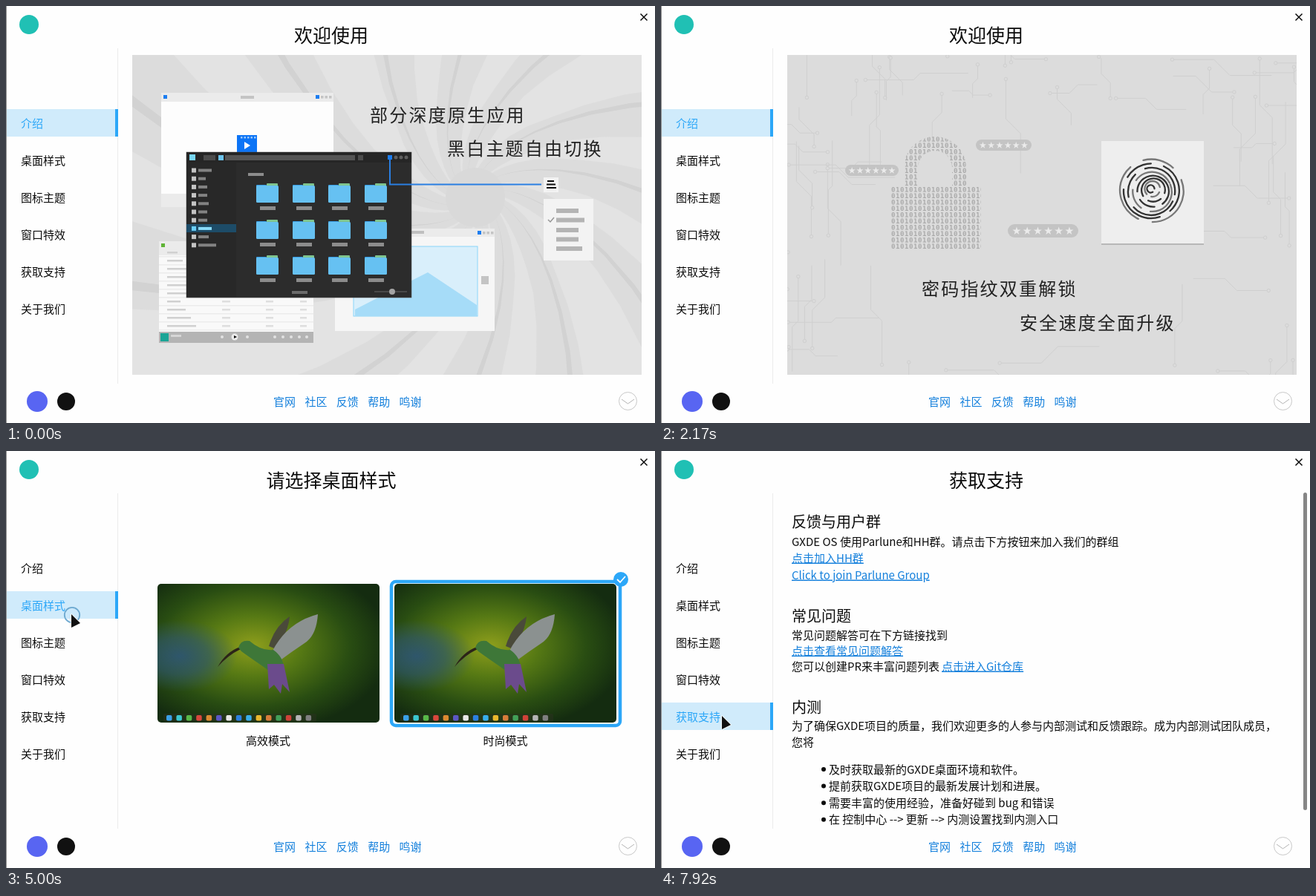
Write an HTML page that moves like this. It is 874x562 px and loops after 8 s.

```html
<!DOCTYPE html>
<html lang="zh-CN">
<head>
<meta charset="utf-8">
<title>欢迎使用</title>
<style>
html, body { margin: 0; width: 100%; height: 100%; overflow: hidden; background: #fefefe; }
svg { display: block; width: 874px; height: 562px; font-family: "Noto Sans CJK SC", "Noto Sans CJK", "Noto Sans", sans-serif; }
text { white-space: pre; }
</style>
</head>
<body>
<svg id="stage" viewBox="0 0 874 562" xmlns="http://www.w3.org/2000/svg"></svg>
<script>
const INK = '#0c0c0c', BLUE = '#1580dc', ACCENT = '#2ca7f8';

// Drawing helpers: each returns SVG markup
const rect = (x, y, w, h, fill, rx = 0, more = '') =>
  `<rect x="${x}" y="${y}" width="${w}" height="${h}" rx="${rx}" fill="${fill}" ${more}/>`;
const disc = (x, y, r, fill, more = '') => `<circle cx="${x}" cy="${y}" r="${r}" fill="${fill}" ${more}/>`;
const path = (d, fill, more = '') => `<path d="${d}" fill="${fill}" ${more}/>`;
const line = (d, stroke, w = 1, more = '') => path(d, 'none', `stroke="${stroke}" stroke-width="${w}" ${more}`);
const text = (x, y, s, size = 15, fill = INK, more = '') =>
  `<text x="${x}" y="${y + size * .37}" font-size="${size}" fill="${fill}" ${more}>${s}</text>`;
const mid = (x, y, s, size, fill) => text(x, y, s, size, fill, 'text-anchor="middle"');
const group = (s, more = '') => `<g ${more}>${s}</g>`;
const at = (x, y, s) => group(s, `transform="translate(${x} ${y})"`);
const each = (list, fn) => list.map(fn).join('');
const times = (n, fn) => each([...Array(n).keys()], fn);

let seed = 7;
const rnd = () => (seed = (seed * 16807) % 2147483647) / 2147483647;

// ---------- carousel ----------
const slogan = (x, y, s) => text(x, y, s, 24, '#222', 'letter-spacing="2.2" font-weight="500"');
const backdrop = rect(170, 66, 686, 431, '#dcdcdc');

function swirl(cx, cy) {
  const arm = (a, half, fill) => {
    const edge = s => [...Array(14).keys()].map(i => {
      const r = 36 * 1.27 ** i, th = a + s * half * Math.min(1, r / 150) + .42 * Math.log(r / 36);
      return (cx + r * Math.cos(th)).toFixed(1) + ' ' + (cy + r * Math.sin(th)).toFixed(1);
    });
    return path('M' + [...edge(-1), ...edge(1).reverse()].join('L') + 'Z', fill);
  };
  return times(12, i => arm(i * .524, i % 3 ? .1 : .16, '#e3e3e3') + arm(i * .524 + .23, .014, '#d2d2d2'))
    + disc(cx, cy, 40, '#d9d9d9');
}

function folderGrid() {
  return each([239, 288, 336], y => each([337, 386, 434, 483], x =>
    rect(x + 14, y, 15, 6, '#7fc48e', 1) + rect(x, y + 2, 14, 5, '#3a9fe6', 1) + rect(x, y + 3, 30, 23, '#66c1f2', 1.5) +
    rect(x + 5, y + 31, 21, 5, '#8c8c8c')));
}

function appsSlide() {
  const dots = (x, y) => rect(x, y, 5, 5, '#1c7df0') + times(3, i => rect(x + 7 + i * 5.5, y + 1, 3.5, 3.5, '#c4c4c4'));
  const video = rect(209, 117, 232, 154, '#ebebeb') + rect(209, 129, 232, 124, '#fdfdfd') +
    rect(212, 120, 5, 5, '#1c7df0') + rect(316, 121, 18, 4, '#c4c4c4') + dots(417, 120) +
    rect(311, 174, 27, 23, '#0c74f6') + path('M321 183l8 5-8 5z', '#fff') +
    times(5, i => rect(316 + i * 4.5, 176, 2.5, 2.5, '#9cc8fa'));
  const music = rect(206, 317, 208, 136, '#f9f9f9') + rect(206, 317, 208, 19, '#ebebeb') + rect(209, 320, 5, 5, '#5fb336') +
    times(10, i => { const y = 331 + i * 11;
      return rect(206, y + 6, 208, 1.5, '#ececec') + rect(217, y, 14 + i * 7 % 38, 2.5, '#d0d0d0') +
        rect(291, y, 11, 2.5, '#dedede') + rect(350, y, 10, 2.5, '#dedede') + rect(396, y, 9, 2.5, '#dedede'); }) +
    rect(206, 439, 208, 15, '#b4b4b4') + rect(208, 441, 11, 11, '#1ba596') + rect(222, 443, 14, 3, '#d6d6d6') +
    disc(308, 446, 4.5, '#ececec') + path('M307 444l4 2-4 2z', INK) +
    each([291, 325, 362, 373, 384, 395, 405], x => disc(x, 446, 2, '#e2e2e2'));
  const photo = rect(443, 300, 215, 138, '#f6f6f6') + rect(443, 300, 215, 11, '#ebebeb') + rect(540, 303, 23, 4, '#bfbfbf') + dots(635, 303) +
    rect(468, 324, 167, 94, '#d9effb', 0, 'stroke="#8ad6fa"') + path('M470 418V409L568 359 634 403V418Z', '#a6dcf8') +
    rect(640, 364, 10, 11, '#c4c4c4');
  const widths = [18, 10, 12, 12, 14, 12, 12, 18, 14, 24];
  const files = rect(243, 197, 303, 196, '#2c2c2c', 0, 'stroke="#555" stroke-width=".6"') + rect(243, 197, 303, 14, '#262626') +
    rect(243, 211, 67, 181, '#282828') + rect(247, 200, 8, 8, '#78d6f2') + rect(266, 201, 16, 7, '#4c4c4c') +
    rect(286, 201, 7, 7, '#6cc4ee') + rect(295, 201, 175, 7, '#555') + rect(474, 201, 7, 7, '#4c4c4c') +
    rect(514, 201, 6, 6, '#1c7df0') + times(3, i => disc(525 + i * 7, 204, 2.5, '#606060')) +
    rect(243, 294, 67, 11, '#1d4c68') +
    each(widths, (w, i) => rect(250, 218.5 + i * 11.2, 6, 6, i == 7 ? '#6bd0fb' : '#c4c4c4') +
      rect(259, 219.5 + i * 11.2, w, 4, i == 7 ? '#8adcfb' : '#828282')) +
    rect(326, 225, 21, 4, '#8c8c8c') + folderGrid() + rect(385, 384, 21, 4, '#6c6c6c') +
    line('M496 385H540', '#666') + disc(520, 385, 4, '#a4a4a4');
  const menu = line('M517 207V240.5H721', '#2a7fe2', 2) + rect(724, 231, 20, 20, '#f3f3f3') +
    line('M729 236H738M728 240.5H740M728 245H741', INK, 2) + rect(724, 260, 67, 83, '#f3f3f3') +
    each([[273, 30], [285.5, 38], [299, 30], [311.5, 30], [324, 35]], ([y, w]) => rect(741, y, w, 6, '#b4b4b4')) +
    line('M730 288l3 3 5-6', '#969696', 1.5);
  return backdrop + swirl(632, 258) + video + music + photo + files + menu +
    slogan(490, 147, '部分深度原生应用') + slogan(594, 192, '黑白主题自由切换');
}

function circuits() {
  return times(170, () => {
    const x = 170 + rnd() * 686, y = 66 + rnd() * 431, l = 15 + rnd() * 50, d = 5 + rnd() * 18;
    const sx = rnd() < .5 ? -1 : 1, sy = rnd() < .5 ? -1 : 1;
    if (Math.abs(x - 513) < 285 && Math.abs(y - 300) < 175) return '';
    const run = rnd() < .5 ? `h${l * sx}l${d * sx} ${d * sy}h${l * sx}` : `v${l * sy}l${d * sx} ${d * sy}v${l * sy}`;
    return line(`M${x} ${y}${run}`, '#cfcfcf', 1) + disc(x, y, 2.2, '#dcdcdc', 'stroke="#cfcfcf"');
  });
}

function fingerprint(cx, cy) {
  return times(8, i => {
    const r = 5 + i * 5.3, gap = 5 + i * 2.1;
    return `<ellipse cx="${cx}" cy="${cy + 3 - i * .4}" rx="${r}" ry="${r * 1.02}" fill="none" stroke="${i % 3 == 1 ? '#777' : '#333'}"
      stroke-width="2.3" stroke-linecap="round" stroke-dasharray="${18 + i * 9} ${gap} ${8 + i * 5} ${gap}" transform="rotate(${150 + i * 47} ${cx} ${cy})"/>`;
  });
}

function lockSlide() {
  const pill = (x, y, w, h) => rect(x, y, w, h, '#c4c4c4', h / 2) +
    times(6, i => mid(x + w * (i + .85) / 6.7, y + h / 2, '★', h * .66, '#ebebeb'));
  return backdrop + circuits() +
    rect(310, 243, 121, 86, 'url(#digits)') + path('M327 243V218A42 42 0 0 1 411 218V243H392V218A23 23 0 0 0 346 218V243Z', 'url(#digits)') +
    pill(424, 180, 75, 15) + pill(248, 214, 72, 15) + pill(467, 294, 95, 18) +
    rect(593, 184, 138, 138, '#b8b8b8') + rect(593, 182, 138, 138, '#eee') + fingerprint(661, 249) +
    slogan(351, 381, '密码指纹双重解锁') + slogan(483, 427, '安全速度全面升级');
}

function panelSlide() {
  const LIGHT = '#f5f5f5', PALE = '#e6e6e6';
  const card = (y, h) => rect(687, y, 165, h, '#c2c2c2');
  const slider = (y, knob) => card(y, 34) + rect(694, y + 6, 27, 4, LIGHT) + rect(835, y + 6, 13, 4, LIGHT) +
    line(`M700 ${y + 17}H842`, PALE, 1.5) + times(7, i => rect(699 + i * 23.5, y + 23, 1.5, 4, PALE)) + disc(knob, y + 16, 2.5, LIGHT);
  const heading = (y, w) => rect(692, y - 5, 10, 10, LIGHT, 3) + rect(707, y - 3.5, w, 7, PALE);
  const cat = path('M750 338Q751 324 757 319l5 4q8-2 16 0l6-4q5 6 5 19Z', LIGHT) +
    line('M736 338H811', LIGHT) + rect(749, 334, 12, 8, LIGHT, 4) + rect(783, 334, 12, 8, LIGHT, 4) + line('M764 332h2M778 332h2', '#a0a0a0', 1.5);
  return backdrop + swirl(622, 268) + rect(656, 66, 200, 431, '#ababab') +
    rect(687, 73, 9, 9, PALE, 2) + rect(753, 74, 28, 8, LIGHT, 1) +
    slider(94, 769) + slider(132, 840) + card(172, 11) + card(184, 11) + rect(694, 175, 72, 5, LIGHT) + rect(694, 187, 72, 5, LIGHT) +
    disc(836, 178, 2.5, LIGHT) + rect(833, 186, 14, 6, '#888', 3) + disc(844, 189, 2.5, LIGHT) +
    heading(216, 54) + card(227, 10) + disc(836, 232, 2.5, LIGHT) + slider(241, 699) + slider(277, 793) + card(313, 36) + rect(694, 317, 27, 5, LIGHT) + cat +
    card(354, 12) + rect(694, 358, 15, 4, LIGHT) + slider(368, 769) + card(403, 11) + rect(694, 406, 27, 5, LIGHT) + disc(836, 408, 2.5, LIGHT) +
    heading(435, 36) + slider(446, 769) + card(484, 13) + rect(694, 487, 27, 4, LIGHT) +
    times(12, i => disc(671, 136.5 + i * 22.3, i == 8 ? 7 : 5, i == 8 ? '#e4e4e4' : '#c4c4c4')) +
    path('M672 315v11l5-3z', INK) +
    slogan(249, 264, '控制中心左侧导航') + slogan(357, 309, '一键直达设置选项');
}

// ---------- icon theme page (icons centred on 0,0) ----------
const gear = (n, r, fill) => times(n, i => rect(-5, -r, 10, 14, fill, 3, `transform="rotate(${i * 360 / n})"`)) + disc(0, 0, r * .78, fill);
const film = rect(-21, -21, 42, 42, '#0878e8', 2) + times(7, i => rect(-18 + i * 5.5, -18, 3, 4, '#043f88') + rect(-18 + i * 5.5, 14, 3, 4, '#043f88')) +
  rect(-20, -11, 40, 22, '#0f68d0') + path('M-5-7L8 0-5 7Z', '#fff');
const note = fill => line('M0 8V-10q2 5 7 7', fill, 2.5) + `<ellipse cx="-4" cy="8" rx="5" ry="4" fill="${fill}"/>`;

const light = [
  path('M-19-11L2-21 16-11Z', '#179be8') + rect(-19, -12, 37, 33, '#62d2fa', 2) + rect(-17, -10, 33, 5, '#c8f2ff') +
    rect(-6, -5, 12, 16, '#a8e8fd', 2) + disc(0, -1, 3, '#fff') + rect(-1, 2, 2, 6, '#fff'),
  disc(9, 0, 18, '#222b22') + disc(9, 0, 4, '#7db400') + rect(-22, -19, 30, 38, '#8fcb0f', 2) + at(-6, 1, note('#fff')),
  rect(-19, -16, 39, 37, '#f5f5f5', 1, 'stroke="#ddd"') + rect(-16, -12, 33, 26, '#f9b234') + path('M-16 14L-4-4 5 6 9 1 17 14Z', '#8b78c8') + path('M-16 14L-8 4 0 14Z', '#6d68bc'),
  rect(-21, -19, 10, 34, '#0b58c8', 1) + rect(-13, -16, 34, 37, '#188cfa', 2) + times(6, i => rect(-10, -13 + i * 5.5, 3, 3, '#b6e0ff')) + path('M-2-6L10 1-2 8Z', '#fff'),
  disc(0, 0, 21, '#e4493c'),
  gear(8, 21, '#dedee0') + disc(0, 0, 11, '#f5f5f5', 'stroke="#f07b78" stroke-width="4"')];
const flat = [
  rect(-15, -22, 30, 6, '#37a6e0') + rect(-18, -16, 36, 6, '#7cc34a') + rect(-20, -11, 40, 6, '#e59a37') + rect(-22, -6, 44, 27, '#8a7b5a', 2) + rect(-7, 4, 14, 4, '#f7f4ea', 1),
  disc(0, 0, 21, '#525252') + note('#46c838'),
  rect(-21, -19, 43, 38, '#209cf0', 2) + disc(-10, -8, 7, '#fdd638') + path('M-21 19V10L-8-1 9 19Z', '#247f4a') + disc(2, 1, 5, '#fff') + disc(9, -2, 7, '#fff') + rect(-2, 0, 20, 7, '#fff', 3.5),
  film, light[4],
  gear(6, 21, '#11805c') + disc(0, 0, 10, '#fefefe') + rect(-3.5, 0, 7, 20, '#e2e2e2', 3) + rect(-2.5, -10, 5, 9, '#11805c')];
const sea = [
  rect(-20, -19, 39, 38, '#71c7b8', 3) + path('M3 18Q6 0 20 8q5 8-1 10Z', '#6d5680') + line('M8 17l4-10M14 18l2-9', '#a990b8', 1.5),
  `<ellipse rx="15" ry="10" fill="#6b8b3c" transform="rotate(35)"/>` + disc(-12, -15, 6, '#9aaf65') + line('M-6-6l20-7M-8 2l-10 7M2 8l0 11M10 8l9 6', '#879c4a', 5, 'stroke-linecap="round"') + line('M-7-4l14 9M1-8l-4 13', '#435f28', 1.5),
  rect(-21, -5, 42, 13, '#b8721c', 4) + disc(0, -3, 18, '#d9932b') + rect(-17, 12, 34, 9, '#c47e22', 3) + disc(0, -3, 12, '#382e20') + line('M-9-9L9 5M9-9L-9 5M0-14V9M-11-3H11', '#d9932b', 2),
  times(7, i => disc(14 * Math.cos(i * .9), 14 * Math.sin(i * .9), 8, i % 2 ? '#5e8034' : '#486a2a')) + disc(0, 0, 14, '#55772e') + path('M-5-8L9 0-5 8Z', '#26370f'),
  disc(0, 0, 21, '#ef9a88'),
  times(8, i => rect(-1.5, -22, 3, 22, '#c58a2e', 1.5, `transform="rotate(${i * 45})"`)) + disc(0, 0, 14, 'none', 'stroke="#d99b36" stroke-width="5"') + disc(0, 0, 5, '#a66d20')];

const badge = (x, y) => disc(x, y, 10, ACCENT) + line(`M${x - 5} ${y}l4 4 7-8`, '#fff', 1.8);
const title = s => mid(438, 40, s, 25);

function iconPage() {
  const themes = [['deepin', light], ['ePapirus', flat], ['ePapirus-Dark', flat], ['gxde', light], ['gxde-dark', light], ['gxde-Sea', sea]];
  const cards = each(themes, ([name, icons], i) => {
    const x = 176 + i % 2 * 336.5, y = 92 + (i >> 1) * 149;
    const frame = i == 3 ? rect(509.5, 236.5, 332, 76, '#fefefe', 5, `stroke="${ACCENT}" stroke-width="4.5"`)
      : rect(x + .5, y + .5, 324, 69, '#fefefe', 5, 'stroke="#ececec"');
    return frame + each(icons, (icon, k) => at(x + 30 + k * 52.8, y + 34, icon)) + mid(x + 161.5, y + 93, name);
  });
  return title('请选择图标主题') + group(cards, 'clip-path="url(#list)"') + badge(843, 234);
}

// ---------- two-choice pages ----------
const dockColors = ['#3aa0e8', '#3bc7d0', '#58b848', '#d9473c', '#dc8a31', '#5b57c4', '#e8e8e8', '#2c80e0', '#38aeec', '#e9b82d', '#d77c3a', '#42a058', '#cf4238', '#b5b5b5', '#7f7f7f'];

function desktop(x, panel) {
  const bird = path('M81 112Q92 92 111 85L112 88Q95 96 81 112Z', '#2c2418') +
    path('M150 84Q158 57 178 44 176 66 160 88Z', '#4a4a3a') + path('M154 92Q174 52 216 41 214 70 198 80 180 92 164 104Z', '#8b9190') +
    path('M109 86Q112 75 124 77 140 91 156 89 170 99 170 114 156 123 143 112 124 99 113 91Z', '#3e7738') +
    path('M148 108L170 108 178 146 168 135 166 148 157 136 150 142Z', '#6b4b8c');
  const bars = [[22, 16], [56, 10], [91, 12], [126, 20], [152, 14]];
  const side = panel && rect(216, 0, 83, 187, panel) + rect(249, 4, 20, 3, '#c9c9c9') +
    each(bars, ([y, w]) => disc(222, y - 4, 2, '#eee') + rect(227, y - 5, w, 2.5, '#aaa')) +
    each([[24, 10], [35, 8], [61, 23], [88, 7], [97, 7], [108, 8], [133, 8], [160, 8], [170, 8], [179, 6]], ([y, h]) => rect(218, y, 79, h, '#aaa', 1, 'opacity=".28"')) +
    rect(226, 72, 64, 1, '#bbb') + path('M286 70h4v3l-2 2-2-2z', '#fff') + disc(290, 181, 2, '#fff');
  return at(x, 179, group(rect(0, 0, 299, 187, 'url(#leaf)') + rect(0, 0, 299, 187, 'url(#haze)') + bird + (side || '') +
    rect(8, 175, 206, 11, '#2a3020', 2, 'opacity=".5"') + each(dockColors, (c, i) => rect(12 + i * 13.4, 177, 7.5, 7.5, c, 2)), 'clip-path="url(#thumb)"'));
}

const choice = (heading, left, right, panels) => title(heading) + desktop(204, panels[0]) + desktop(523, panels[1]) +
  rect(519, 176, 308, 194, 'none', 6, `stroke="${ACCENT}" stroke-width="4.5"`) + badge(828, 173) +
  mid(353, 390, left) + mid(672.5, 390, right);

// ---------- support page ----------
function supportPage() {
  const link = (x, y, s) => text(x, y, s, 15, BLUE, 'text-decoration="underline"');
  const head = (y, s) => text(176, y, s, 20);
  const bullets = ['及时获取最新的GXDE桌面环境和软件。', '提前获取GXDE项目的最新发展计划和进展。', '需要丰富的使用经验，准备好碰到 bug 和错误', '在 控制中心 --&gt; 更新 --&gt; 内测设置找到内测入口'];
  return title('获取支持') +
    head(96, '反馈与用户群') + text(176, 122, 'GXDE OS 使用Parlune和HH群。请点击下方按钮来加入我们的群组') +
    link(176, 144, '点击加入HH群') + link(176, 167, 'Click to join Parlune Group') +
    head(223, '常见问题') + text(176, 248, '常见问题解答可在下方链接找到') + link(176, 269, '点击查看常见问题解答') +
    text(176, 290, '您可以创建PR来丰富问题列表') + link(378, 290, '点击进入Git仓库') +
    head(346, '内测') + text(176, 370, '为了确保GXDE项目的质量，我们欢迎更多的人参与内部测试和反馈跟踪。成为内部测试团队成员，') + text(176, 392, '您将') +
    each(bullets, (s, i) => disc(219, 429 + i * 22.6, 3, INK) + text(226, 429 + i * 22.6, s)) +
    rect(865, 56, 5, 428, '#868686', 2.5);
}

// ---------- assembly ----------
const menu = ['介绍', '桌面样式', '图标主题', '窗口特效', '获取支持', '关于我们'];
const slides = [appsSlide(), lockSlide(), panelSlide()];
const pages = [
  title('欢迎使用') + each(slides, (s, i) => group(group(s, 'clip-path="url(#slide)"'), `id="slide${i}"`)),
  choice('请选择桌面样式', '高效模式', '时尚模式', ['', '']),
  iconPage(),
  choice('请选择是否开启窗口特效', '关闭窗口特效', '开启窗口特效', ['#4c4c48', '#161c12']),
  supportPage()];

const clip = (id, x, y, w, h, rx) => `<clipPath id="${id}">${rect(x, y, w, h, '#000', rx)}</clipPath>`;
const radial = (id, cx, cy, r, stops) => `<radialGradient id="${id}" cx="${cx}" cy="${cy}" r="${r}">` +
  each(stops, ([o, c, a = 1]) => `<stop offset="${o}" stop-color="${c}" stop-opacity="${a}"/>`) + '</radialGradient>';
const digits = `<pattern id="digits" width="12" height="8.5" x="310" y="243" patternUnits="userSpaceOnUse">
  <text y="7.5" font-size="9" font-weight="700" fill="#a8a8a8" font-family="DejaVu Sans Mono, monospace" letter-spacing=".6">01</text></pattern>`;

document.getElementById('stage').innerHTML =
  `<defs>${clip('slide', 170, 66, 686, 431)}${clip('list', 150, 60, 724, 428)}${clip('thumb', 0, 0, 299, 187, 5)}${digits}` +
  radial('leaf', .43, .45, .62, [[0, '#8f9f1c'], [.35, '#567914'], [.7, '#294d12'], [1, '#142c10']]) +
  radial('haze', .1, .52, .26, [[0, '#2d5575', .9], [.5, '#2d5575', .6], [1, '#2d5575', 0]]) + '</defs>' +
  rect(0, 0, 874, 562, '#fefefe') + rect(0, 0, 1, 562, '#949494') + line('M150.5 57V509', '#ececec') +
  disc(31, 25, 13, '#20c0b4') + line('M854.5 10.5l9 9M863.5 10.5l-9 9', INK, 1.5) +
  group(rect(1, 0, 146, 37, '#d0ebfb') + rect(147, 0, 4, 37, ACCENT), 'id="mark"') +
  each(menu, (s, i) => text(20, 158 + i * 50, s, 15, INK, `id="item${i}" font-weight="500"`)) +
  each(pages, (s, i) => group(s, `id="page${i}"`)) +
  rect(865, 75, 5, 238, '#868686', 2.5, 'id="bar"') +
  disc(42, 533, 14, '#5865f2') + disc(81, 533, 12, '#111') +
  each(['官网', '社区', '反馈', '帮助', '鸣谢'], (s, i) => text(360 + i * 42.4, 533, s, 15, BLUE, 'font-weight="500"')) +
  disc(837.5, 532.5, 12, 'none', 'stroke="#c8c8c8"') + line('M829 530l8.5 6 8.5-6', '#b4b4b4') +
  disc(0, 0, 1, '#bfe3fa', 'id="ring" fill-opacity=".25" stroke="#6da9d0" stroke-width="1.8"') +
  path('M0 0V18L12 12Z', '#111', 'id="pointer" stroke="#fff" stroke-width="1.5" stroke-linejoin="round" paint-order="stroke"');

// ---------- timing ----------
const LOOP = 8000, STEP = 1000 / 12;
const clicks = [[4830, 1], [5500, 2], [6580, 3], [7580, 4]];
const fades = [[1333, 2167], [3333, 4083]];
const route = [[4330, 0, 276], [4420, 30, 268], [4500, 60, 248], [4580, 79, 230], [4670, 88, 220], [5100, 88, 220],
  [5330, 91, 260], [6080, 91, 260], [6420, 85, 310], [7050, 85, 310], [7330, 83, 354], [7417, 82, 357], [LOOP, 82, 357]];
const $ = id => document.getElementById(id);
const show = (id, on) => $(id).setAttribute('display', on ? 'inline' : 'none');
const move = (id, x, y) => $(id).setAttribute('transform', `translate(${x} ${y})`);

function pointerAt(t) {
  const i = Math.max(1, route.findIndex(k => k[0] >= t));
  const [a, x, y] = route[i - 1], [b, u, v] = route[i], p = Math.max(0, (t - a) / (b - a));
  return [x + (u - x) * p, y + (v - y) * p];
}

function draw(t) {
  const click = clicks.filter(c => c[0] <= t).pop(), page = click ? click[1] : 0;
  pages.forEach((_, i) => show('page' + i, i == page));
  menu.forEach((_, i) => $('item' + i).setAttribute('fill', i == page ? ACCENT : INK));
  move('mark', 0, 139 + page * 50);
  show('bar', page == 2 && t < 6400);

  const shown = fades.map(([a, b]) => {
    const p = Math.min(1, Math.max(0, (t - a) / (b - a)));
    return 1 - (1 - p) ** 2;
  });
  slides.forEach((_, i) => {
    const come = i ? shown[i - 1] : 1, go = i < 2 ? shown[i] : 0;
    move('slide' + i, 30 * (come - 1 + go), 0);
    $('slide' + i).setAttribute('opacity', come * (1 - go));
  });

  const [x, y] = pointerAt(t), age = click ? t - click[0] : LOOP;
  show('pointer', t >= 4330);
  move('pointer', x, y);
  show('ring', age < 320);
  $('ring').setAttribute('r', Math.max(2, age * .06));
  $('ring').setAttribute('opacity', Math.min(1, (340 - age) / 100));
  move('ring', x + 1, y + 1);
}

const start = performance.now();
function tick() {
  const t = (performance.now() - start) % LOOP;
  draw(Math.floor((t + 5) / STEP) * STEP);
  requestAnimationFrame(tick);
}
tick();
</script>
</body>
</html>
```
